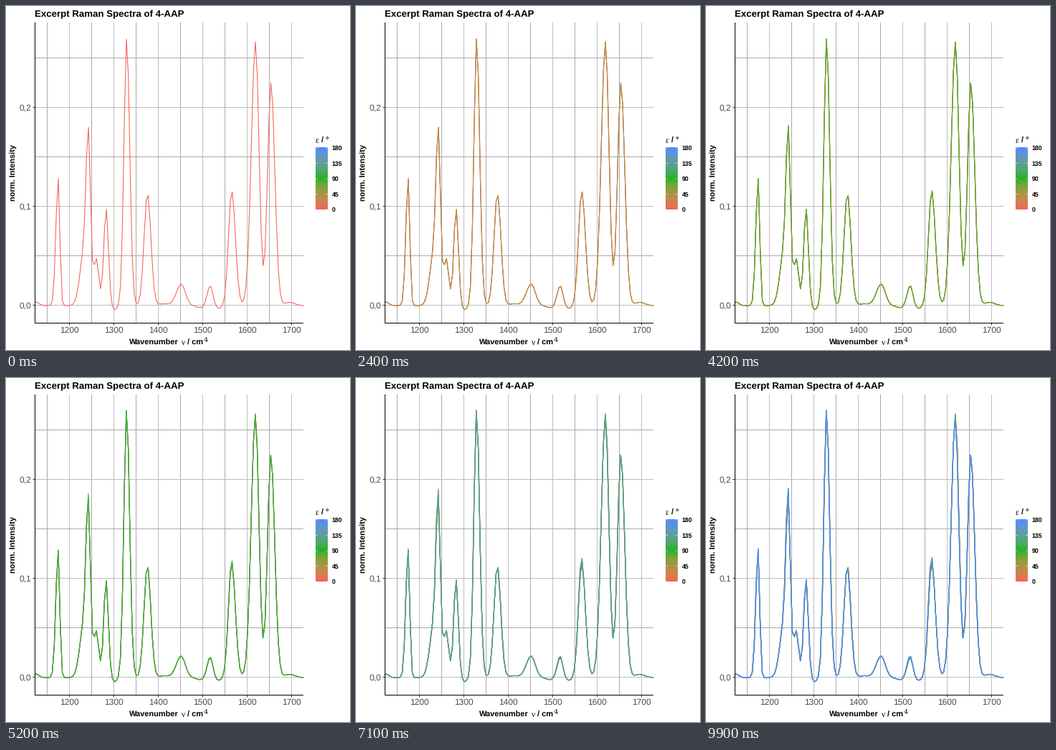
Recreate the animation shown at these times as a matplotlib script. Size 480 px wide and 480 px high, loop 10000 ms.

```python
import numpy as np
import matplotlib.pyplot as plt
from matplotlib.animation import FuncAnimation

SIZE, DPI = 480, 72
FRAMES, INTERVAL = 100, 100
STATES = 10
LEFT, RIGHT, TOP, BOTTOM = 40.5, 415, 23, 442.5
BASE = 418

# Bands in stage pixels: centre, height, left and right sigma, gain at 180 degrees
BANDS = [
    (42, 5, 4, 4, 0),
    (72.8, 178, 3.2, 2.3, 3),
    (109, 75, 5.8, 5.8, 0),
    (114.9, 206, 3.05, 3.05, 16),
    (125.9, 65, 3.3, 3.6, 0),
    (139.7, 136, 3.2, 3.2, 3),
    (151.5, -6, 3.5, 3.5, 0),
    (168.4, 374, 3.8, 4.2, 1.5),
    (197.4, 157, 4.7, 4.8, -3),
    (220, 2.5, 7, 7, 0),
    (244.5, 30, 6.8, 5.8, 0),
    (272, -3, 6, 6, 0),
    (285, 28, 4.3, 3.6, 3),
    (297, -4, 4, 4, 0),
    (315, 160, 4.5, 5.1, 9),
    (348.1, 368, 5.8, 4.9, -7),
    (369.7, 311, 4.7, 5.4, 0),
    (396, 4.5, 7, 7, 0),
]

RGB_XYZ = np.array([[0.4124, 0.3576, 0.1805],
                    [0.2126, 0.7152, 0.0722],
                    [0.0193, 0.1192, 0.9505]])
WHITE = RGB_XYZ.sum(axis=1)
XYZ_LAB = np.array([[0, 116, 0], [500, -500, 0], [0, 200, -200]])
STOPS = np.array([(246, 97, 89), (24, 178, 42), (80, 139, 254)]) / 255


def to_lab(rgb):
    lin = np.where(rgb > 0.04045, ((rgb + 0.055) / 1.055) ** 2.4, rgb / 12.92)
    return np.cbrt(lin @ RGB_XYZ.T / WHITE) @ XYZ_LAB.T


def from_lab(lab):
    xyz = (lab @ np.linalg.inv(XYZ_LAB).T) ** 3 * WHITE
    lin = np.clip(xyz @ np.linalg.inv(RGB_XYZ).T, 0, 1)
    return np.where(lin > 0.0031308, 1.055 * lin ** (1 / 2.4) - 0.055, 12.92 * lin)


def gradient(t):
    """Colour at t in 0..1, blended in Lab."""
    lab = to_lab(STOPS)
    t = np.atleast_1d(t)
    return from_lab(np.stack([np.interp(t, [0, 0.5, 1], c) for c in lab.T], axis=-1))


def spectrum(angle):
    # Detector points lie slightly closer together at high wavenumbers
    n = np.arange(-46, 92)
    x = 168 + 2.77 * n - 0.00065 * n ** 2
    grown = 1 / (1 + np.exp((100 - angle) / 15))
    y = np.full(len(x), float(BASE))
    for centre, height, left, right, gain in BANDS:
        sigma = np.where(x < centre, left, right)
        y -= (height + gain * grown) * np.exp(-((x - centre) / sigma) ** 2 / 2)
    return np.clip(x, LEFT, RIGHT) - angle / 500, y


plt.rcParams["text.hinting"] = "none"
fig = plt.figure(figsize=(SIZE / DPI, SIZE / DPI), dpi=DPI, facecolor="white")
ax = fig.add_axes([0, 0, 1, 1])
ax.set_axis_off()


def text(x, y, s, size, font="Liberation Sans", bold=True, color="black", **kw):
    ax.text(x, y, s, fontsize=size, family=font, color=color,
            weight="bold" if bold else "normal", **{"va": "baseline", **kw})


def seg(x, y, color, lw=1.0, z=1):
    ax.plot(x, y, color=color, lw=lw, zorder=z, solid_capstyle="butt", snap=False)


def x_px(wavenumber):
    return 88.5 + (wavenumber - 1200) * 0.62


def y_px(intensity):
    return 417.5 - intensity * 1380


# Grid, axes and tick labels
for v in range(1150, 1701, 50):
    major = v % 100 == 0
    seg([x_px(v)] * 2, [TOP, BOTTOM], "#bebebe" if major else "#a9a9a9")
    if major:
        seg([x_px(v)] * 2, [BOTTOM, BOTTOM + 3], "#333333", z=5)
        text(x_px(v) - 0.5, 456, str(v), 12, bold=False, color="#4d4d4d", ha="center")
for i in range(6):
    y = y_px(i * 0.05)
    major = i % 2 == 0
    seg([LEFT, RIGHT], [y, y], "#bebebe" if major else "#a9a9a9")
    if major:
        seg([LEFT - 3, LEFT], [y, y], "#333333", z=5)
        text(35, y + 4.3, f"0,{i // 2}", 12, bold=False, color="#4d4d4d", ha="right")
seg([LEFT, LEFT], [TOP, BOTTOM + 0.5], "black", z=5)
seg([LEFT - 0.5, RIGHT], [BOTTOM, BOTTOM], "black", z=5)

# Titles
text(40, 15, "Excerpt Raman Spectra of 4-AAP", 13.2)
text(172, 472.5, "Wavenumber", 11)
text(244.5, 472.5, "ν", 11.5, "Liberation Serif", bold=False)
text(253, 472.5, "/ cm", 11)
text(275.5, 467.5, "-1", 7.7)
text(14, 233, "norm. Intensity", 11, rotation=90, ha="center", rotation_mode="anchor")

# Colour bar
text(431.5, 191, "ε", 11.5, "Liberation Serif", bold=False)
text(439.5, 191, "/ °", 11)
bar = gradient(np.linspace(1, 0, 87))[:, None, :]
ax.imshow(bar, extent=(432, 449, 284, 197.5), aspect="auto", zorder=2)
for i in range(5):
    y = 284 - 21.5 * i
    text(454.5, y + 3.2, str(45 * i), 8.8)
    for x in (432, 445.6):
        seg([x, x + 3.4], [y, y], "white", 0.5, 3)

# One curve per polarisation angle, later ones on top
lines = []
for t in np.linspace(0, 1, STATES):
    line, = ax.plot(*spectrum(180 * t), color=gradient(t)[0], lw=1.07,
                    solid_joinstyle="round", zorder=4)
    lines.append(line)

ax.set_xlim(0, SIZE)
ax.set_ylim(SIZE, 0)


def update(frame):
    shown = frame * STATES // FRAMES
    for k, line in enumerate(lines):
        line.set_visible(k <= shown)
    return lines


anim = FuncAnimation(fig, update, frames=FRAMES, interval=INTERVAL,
                     repeat=True, repeat_delay=0, blit=False)
plt.show()
```
